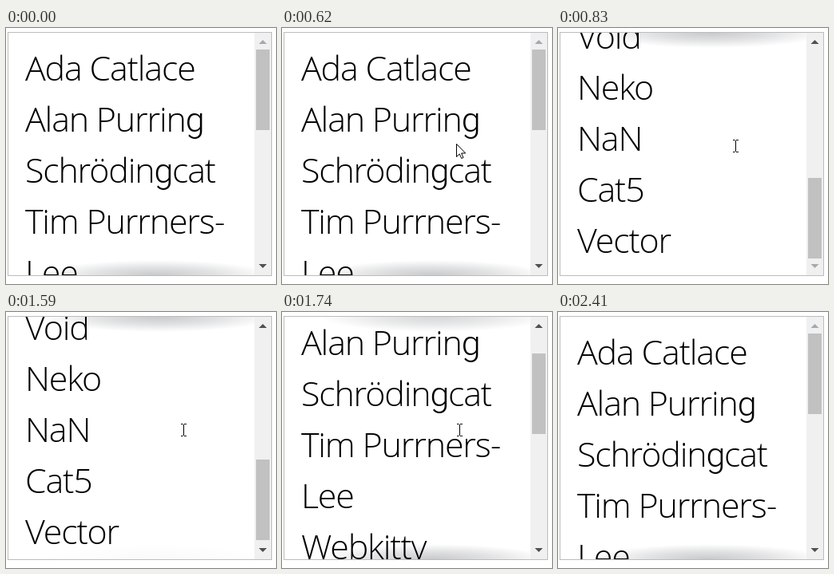
An HTML page that plays this animation: 338x321 px, repeating every 2.8 s.

```html
<!DOCTYPE html>
<html lang="en">
<head>
<meta charset="utf-8">
<title>Scrolling list</title>
<style>
  html, body { margin: 0; height: 100%; overflow: hidden; background: #fff; }
  svg { display: block; width: 100%; height: 100%; }
  text { font: 300 43px "Open Sans", "Noto Sans", sans-serif; letter-spacing: -1.2px; fill: #000; }
  tspan { font-family: Roboto, sans-serif; }
</style>
</head>
<body>
<svg viewBox="0 0 338 321">
  <defs>
    <clipPath id="view"><rect x="3" y="6" width="308" height="304"/></clipPath>
    <radialGradient id="shade">
      <stop offset="0" stop-color="#30383f" stop-opacity=".27"/>
      <stop offset=".5" stop-color="#30383f" stop-opacity=".15"/>
      <stop offset="1" stop-color="#30383f" stop-opacity="0"/>
    </radialGradient>
  </defs>
  <g clip-path="url(#view)">
    <ellipse id="top" cx="192" cy="6" rx="145" ry="19" fill="url(#shade)"/>
    <ellipse id="bottom" cx="188" cy="310" rx="145" ry="19" fill="url(#shade)"/>
    <g id="list"></g>
  </g>
  <rect x="311" y="6" width="21" height="304" fill="#f0f0f0"/>
  <rect id="thumb" x="313" y="27" width="17" height="101" fill="#c1c1c1"/>
  <path id="up" d="M316.5 20 L321.5 15 L326.5 20Z"/>
  <path id="down" d="M316.5 296 L321.5 301 L326.5 296Z"/>
  <rect x="2.5" y="5.5" width="330" height="305" fill="none" stroke="#bcbcbc"/>
  <path id="arrow" d="M.5 .5 V16.5 L4.2 12.9 L6.7 18.5 L9 17.5 L6.6 12 H11.7Z" fill="#fff" stroke="#000"/>
  <path id="beam" d="M-3 -7.5 H-.5 M1 -7.5 H4 M.5 -7 V7 M-3 7.5 H-.5 M1 7.5 H4" fill="none" stroke="#000"/>
</svg>
<script>
const LOOP = 2800, MAX = 488, TRAVEL = 161, STEP = 50;
const lines = ["Ada Catlace", "Alan Purring", "Schrödingcat", "Tim Purrners-", "Lee", "Webkitty",
  "Mittens", "Void", "Neko", "NaN", "Cat5", "Vector"];
const el = id => document.getElementById(id);
const clamp = v => Math.min(1, Math.max(0, v));
const mix = (a, b, p) => a + (b - a) * p;
const ease = p => p < .5 ? 4 * p ** 3 : 1 - 4 * (1 - p) ** 3;
const move = (id, x, y) => el(id).setAttribute("transform", `translate(${x} ${y})`);
const show = (id, on) => el(id).setAttribute("visibility", on ? "visible" : "hidden");

// Progress in n equal jumps, the first one at time "from"
const jumps = (t, from, n) => clamp((Math.floor((t - from) / STEP) + 1) / n);

// The tspan gives a single-storey g
el("list").innerHTML = lines.map((s, i) =>
  `<text x="24" y="${66 + 64 * i}">${s.replace("g", "<tspan>g</tspan>")}</text>`
    .replace(/g(?=<\/text>)/, "<tspan>g</tspan>")).join("");

function drawScroll(t) {
  const p = ease(jumps(t, 680, 4)) - ease(jumps(t, 1590, 6) * .992);
  const y = Math.round(MAX * p);
  move("list", 0, -y);
  move("thumb", 0, Math.round(TRAVEL * p));
  el("top").setAttribute("opacity", clamp(y / 100));
  el("bottom").setAttribute("opacity", clamp((MAX - y) / 100));
  el("up").setAttribute("fill", y ? "#505050" : "#a0aab2");
  el("down").setAttribute("fill", y < MAX ? "#505050" : "#a9a9a9");
}

function drawPointer(t) {
  const enter = jumps(t, 320, 7), leave = jumps(t, 2260, 4);
  const visible = enter > 0 && leave < 1;
  const beam = t >= 680 && leave < .5;
  let x = mix(284, 218, 1 - (1 - enter) ** 2), y = mix(279, 145, 1 - (1 - enter) ** 2);
  if (t >= 680) {
    const out = (leave / .75) ** 1.5;
    x = mix(222, 284, out);
    y = mix(148, 279, out);
  }
  for (const id of ["arrow", "beam"]) {
    move(id, Math.round(x), Math.round(y));
    show(id, visible && beam === (id === "beam"));
  }
}

function frame(now) {
  const t = now % LOOP;
  drawScroll(t);
  drawPointer(t);
  requestAnimationFrame(frame);
}
frame(performance.now());
</script>
</body>
</html>
```
